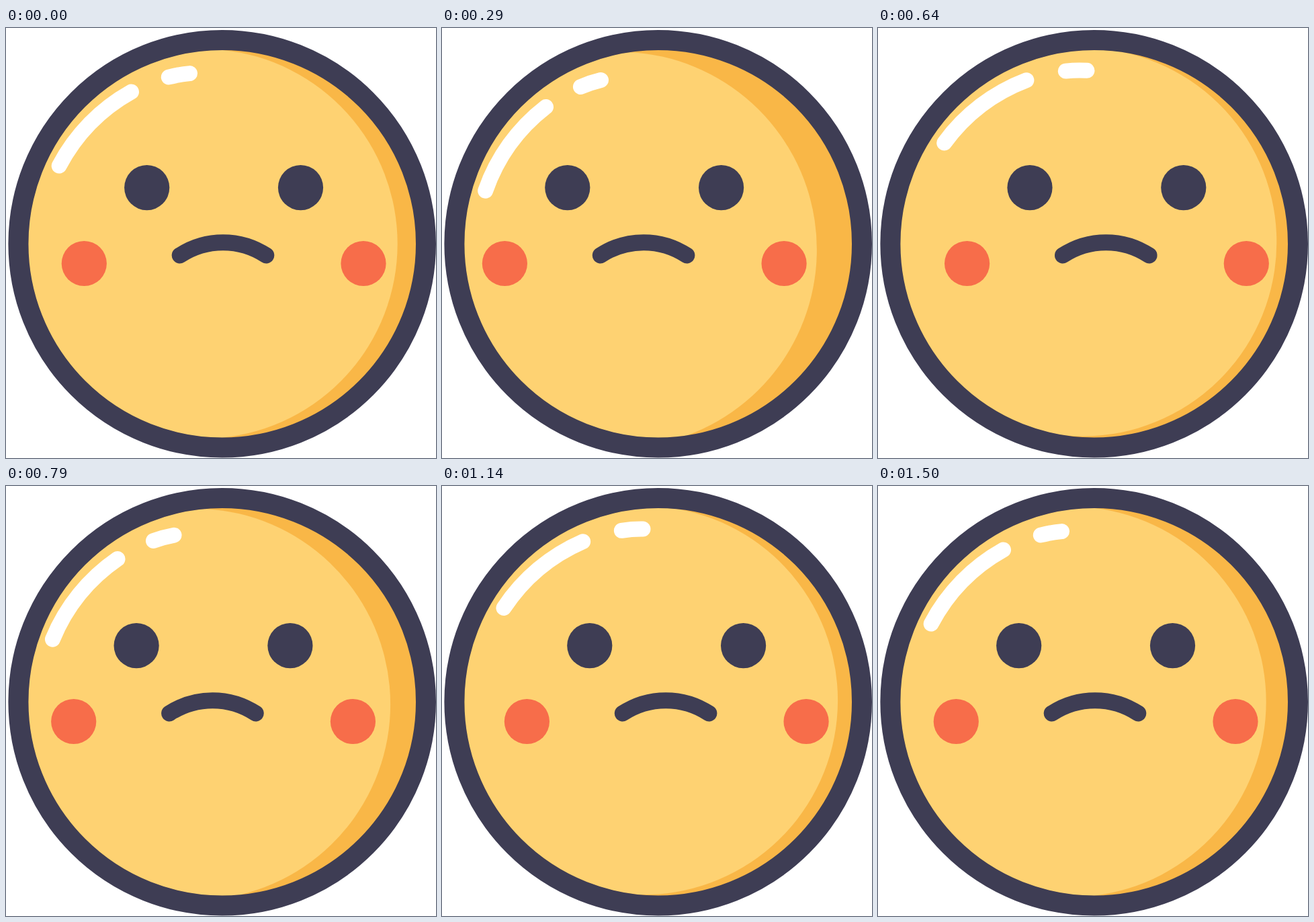
An HTML page for the animation above (2000 ms loop, 640x640 px).

```html
<!DOCTYPE html>
<html lang="en">
<head>
<meta charset="utf-8">
<title>Worried face</title>
<style>
  html, body { margin: 0; width: 100%; height: 100%; overflow: hidden; background: #fff; }
  svg { display: block; width: 100%; height: 100%; }
</style>
</head>
<body>
<svg viewBox="0 0 640 640">
  <circle cx="321.7" cy="321.2" r="290" fill="#f9b747"/>
  <g id="tilt">
    <path id="light" transform="translate(321.7 321.2)" fill="#fed272"/>
    <path d="M79.2 205A270 270 0 0 1 186.5 95M242.3 73Q257.5 69 273.5 67.6"
          fill="none" stroke="#fff" stroke-width="23" stroke-linecap="round"/>
  </g>
  <circle cx="321.7" cy="321.2" r="303.3" fill="none" stroke="#3e3d54" stroke-width="30"/>
  <g id="face">
    <g fill="#3e3d54">
      <circle cx="209.7" cy="237.6" r="33.6"/>
      <circle cx="438.5" cy="237.6" r="33.6"/>
    </g>
    <g fill="#f76d4a">
      <circle cx="116.3" cy="350.5" r="33.6"/>
      <circle cx="532" cy="350.5" r="33.6"/>
    </g>
    <path d="M258.7 338.4A117 117 0 0 1 387.3 338.4"
          fill="none" stroke="#3e3d54" stroke-width="24" stroke-linecap="round"/>
  </g>
</svg>
<script>
const LOOP = 2000, STEP = LOOP / 28, RADIUS = 288.5;

// Key poses: time in ms, face shift, tilt in degrees, bulge of the lit area
const poses = [
  [0, 0, 0, 261],
  [200, -31, -12, 228.5],
  [557, 24.7, 12, 277],
  [907, -31, -12, 240],
  [1262, 24.7, 12, 277],
  [1465, 0, 0, 256]
];

const [tilt, light, face] = ['tilt', 'light', 'face'].map(id => document.getElementById(id));
const ease = p => p * p * (3 - 2 * p);

// The motion runs at 14 steps per second, switching on whole hundredths
function stepTime(ms) {
  let step = Math.floor(ms / STEP) + 1;
  while (Math.round(step * STEP / 10) * 10 > ms) step--;
  return step * STEP;
}

function poseAt(time) {
  const next = poses.findIndex(pose => pose[0] > time);
  if (next < 0) return poses[poses.length - 1];
  const from = poses[next - 1], to = poses[next];
  const p = ease((time - from[0]) / (to[0] - from[0]));
  return from.map((value, i) => value + (to[i] - value) * p);
}

function draw(now) {
  const [, shift, angle, bulge] = poseAt(stepTime(now % LOOP));
  const arc = (bulge * bulge + RADIUS * RADIUS) / (2 * bulge);
  face.setAttribute('transform', `translate(${shift} 0)`);
  tilt.setAttribute('transform', `rotate(${angle} 321.7 321.2)`);
  light.setAttribute('d',
    `M0 ${-RADIUS}A${RADIUS} ${RADIUS} 0 0 0 0 ${RADIUS}A${arc} ${arc} 0 0 0 0 ${-RADIUS}`);
}

const start = performance.now();
function tick() {
  draw(performance.now() - start);
  requestAnimationFrame(tick);
}
tick();
</script>
</body>
</html>
```
